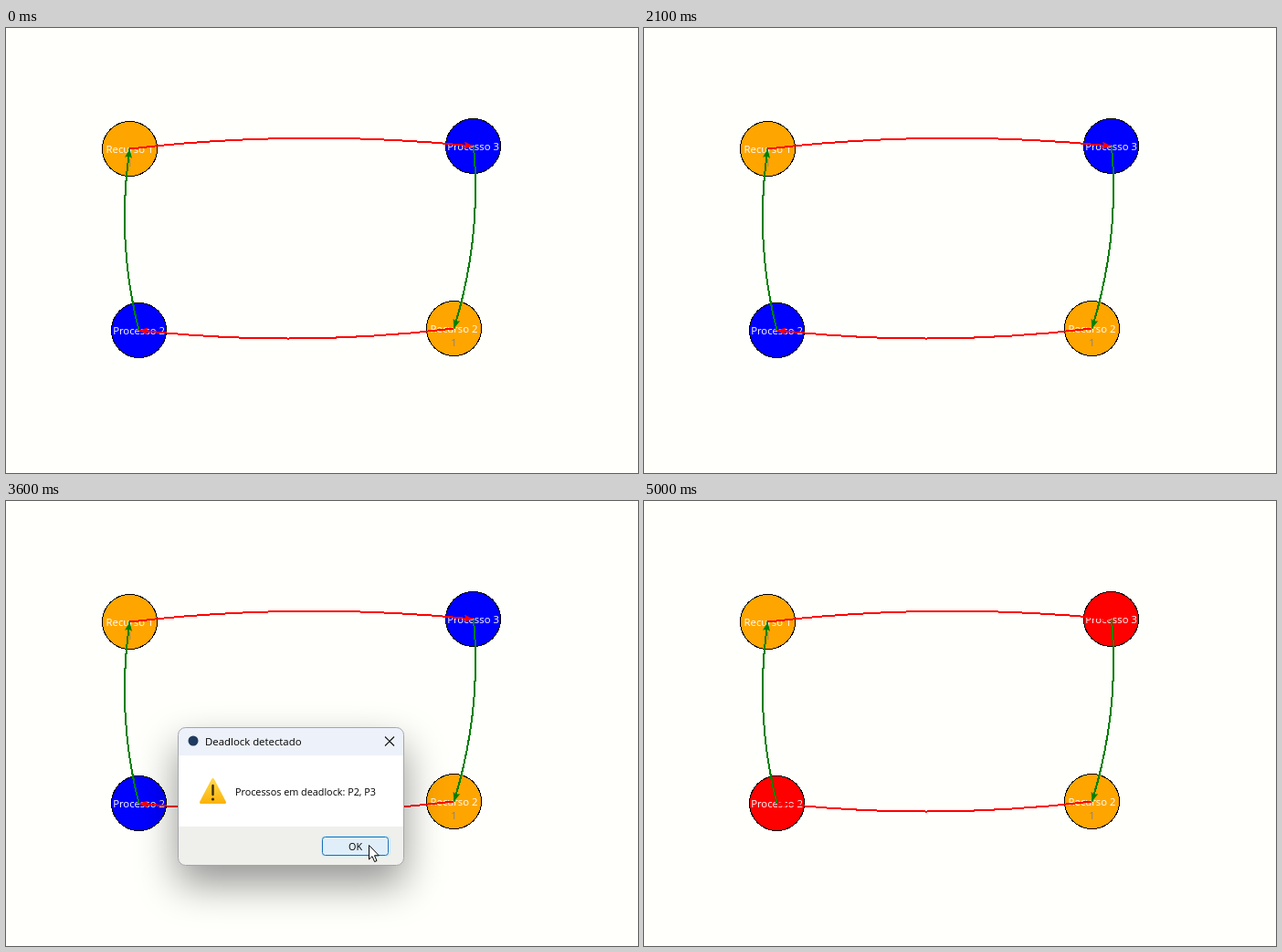
An HTML page that plays this animation: 692x488 px, repeating every 5.1 s.

```html
<!DOCTYPE html>
<html lang="pt">
<head>
<meta charset="utf-8">
<title>Deadlock</title>
<style>
  html, body { margin: 0; width: 100%; height: 100%; overflow: hidden; background: #fffffc; }
  svg { display: block; }
  text { font-family: "Open Sans", "Noto Sans", sans-serif; font-size: 10.8px; }

  .node { stroke: #000; shape-rendering: crispEdges; }
  .resource { fill: #ffa500; }
  .process { fill: #00f; }
  .label text { fill: #fff; font-size: 11.3px; text-anchor: middle; }
  .label .count { fill: #858085; }
  .edge { fill: none; stroke-width: 2; shape-rendering: crispEdges; }
  .holds { stroke: #f00; marker-end: url(#redTip); }
  .waits { stroke: #008000; marker-end: url(#greenTip); }

  .process, .dialog, .button, .cursor { animation: 5100ms step-end infinite; }
  .process { animation-name: alarm; }
  .dialog { animation-name: popup; transform-origin: 238px 294px; }
  .button { animation-name: hover; }
  .cursor { animation-name: point; }

  @keyframes alarm {
    0% { fill: #00f; }
    72.54%, 100% { fill: #f00; }
  }
  @keyframes popup {
    0% { opacity: 0; transform: scale(.95); }
    47.05% { opacity: .4; transform: scale(.96); }
    49.01% { opacity: .9; transform: scale(.99); }
    50.97% { opacity: 1; transform: none; }
    74.5% { opacity: .09; transform: scale(.95); }
    76.46%, 100% { opacity: 0; transform: scale(.95); }
  }
  @keyframes hover {
    0% { fill: #fdfdfd; }
    68.62%, 100% { fill: #e0eef9; }
  }
  @keyframes point {
    0% { opacity: 0; transform: translate(380px, 427px); }
    50.97% { opacity: 1; transform: translate(380px, 427px); }
    52.93% { opacity: 1; transform: translate(372px, 411px); }
    62.74% { opacity: 1; transform: translate(372px, 411px); animation-timing-function: steps(4); }
    70.58% { opacity: 1; transform: translate(397px, 377px); }
    78.42%, 100% { opacity: 0; transform: translate(397px, 377px); }
  }
</style>
</head>
<body>
<svg width="692" height="488" viewBox="0 0 692 488">
  <defs>
    <marker id="redTip" markerUnits="userSpaceOnUse" markerWidth="10" markerHeight="8" refX="10" refY="4" orient="auto">
      <path d="M10 4L0 0L2 4L0 8Z" fill="#f00"/>
    </marker>
    <marker id="greenTip" markerUnits="userSpaceOnUse" markerWidth="10" markerHeight="8" refX="10" refY="4" orient="auto">
      <path d="M10 4L0 0L2 4L0 8Z" fill="#008000"/>
    </marker>
    <filter id="blur" x="-50%" y="-80%" width="200%" height="260%">
      <feGaussianBlur stdDeviation="22"/>
    </filter>
    <linearGradient id="amber" x2="0" y2="1">
      <stop stop-color="#ffd84a"/>
      <stop offset="1" stop-color="#fbb40c"/>
    </linearGradient>
    <clipPath id="frame"><rect x="188.5" y="248.5" width="247" height="151" rx="8"/></clipPath>
  </defs>

  <g>
    <circle class="node resource" cx="135.5" cy="132.5" r="30"/>
    <circle class="node process" cx="511.5" cy="129.5" r="30"/>
    <circle class="node process" cx="145.5" cy="331.5" r="30"/>
    <circle class="node resource" cx="490.5" cy="329.5" r="30"/>
  </g>
  <g class="label">
    <text x="135.5" y="137">Recurso 1</text>
    <text class="count" x="135.5" y="152">1</text>
    <text x="511.5" y="134">Processo 3</text>
    <text x="145.5" y="336">Processo 2</text>
    <text x="490.5" y="334">Recurso 2</text>
    <text class="count" x="490.5" y="349">1</text>
  </g>
  <path class="edge holds" d="M135.5 132.5Q323 110.5 511.5 129.5"/>
  <path class="edge holds" d="M490.5 329.5Q318 350.5 145.5 331.5"/>
  <path class="edge waits" d="M145.5 331.5Q120.5 233 135.5 132.5"/>
  <path class="edge waits" d="M512 129.5Q521 231 490.5 329.5"/>

  <g class="dialog">
    <rect x="188" y="268" width="248" height="152" rx="8" fill-opacity=".42" filter="url(#blur)"/>
    <g clip-path="url(#frame)">
      <rect x="188" y="248" width="248" height="152" fill="#fff"/>
      <rect x="188" y="248" width="248" height="31" fill="#edf1f9"/>
      <rect x="188" y="357" width="248" height="43" fill="#efefec"/>
    </g>
    <rect x="188.5" y="248.5" width="247" height="151" rx="8" fill="none" stroke="#a4a6aa"/>
    <circle cx="205" cy="263" r="5.5" fill="#1f3a5f"/>
    <text x="218" y="268" style="font-size:11.4px">Deadlock detectado</text>
    <path d="M415 258.5L425 268.5M425 258.5L415 268.5" stroke="#111" stroke-width="1.1"/>
    <path d="M226.5 305.5L239.5 330.5H213.5Z" fill="url(#amber)" stroke="url(#amber)" stroke-width="3" stroke-linejoin="round"/>
    <path d="M226.5 312V322" stroke="#3a2a10" stroke-width="2.4" stroke-linecap="round"/>
    <circle cx="226.5" cy="327" r="1.6" fill="#3a2a10"/>
    <text x="251" y="323">Processos em deadlock: P2, P3</text>
    <rect x="345.5" y="367.5" width="75" height="22" rx="4" fill="none" stroke="#c4ecf7"/>
    <rect class="button" x="346.5" y="368.5" width="72" height="20" rx="3" stroke="#1a70b8"/>
    <text x="382.5" y="383" text-anchor="middle">OK</text>
  </g>

  <path class="cursor" d="M.5 .5V16L4 12.7L6.6 18.6L9 17.5L6.5 11.8H11.3Z" fill="#fff" stroke="#000" stroke-linejoin="round"/>
</svg>
</body>
</html>
```
